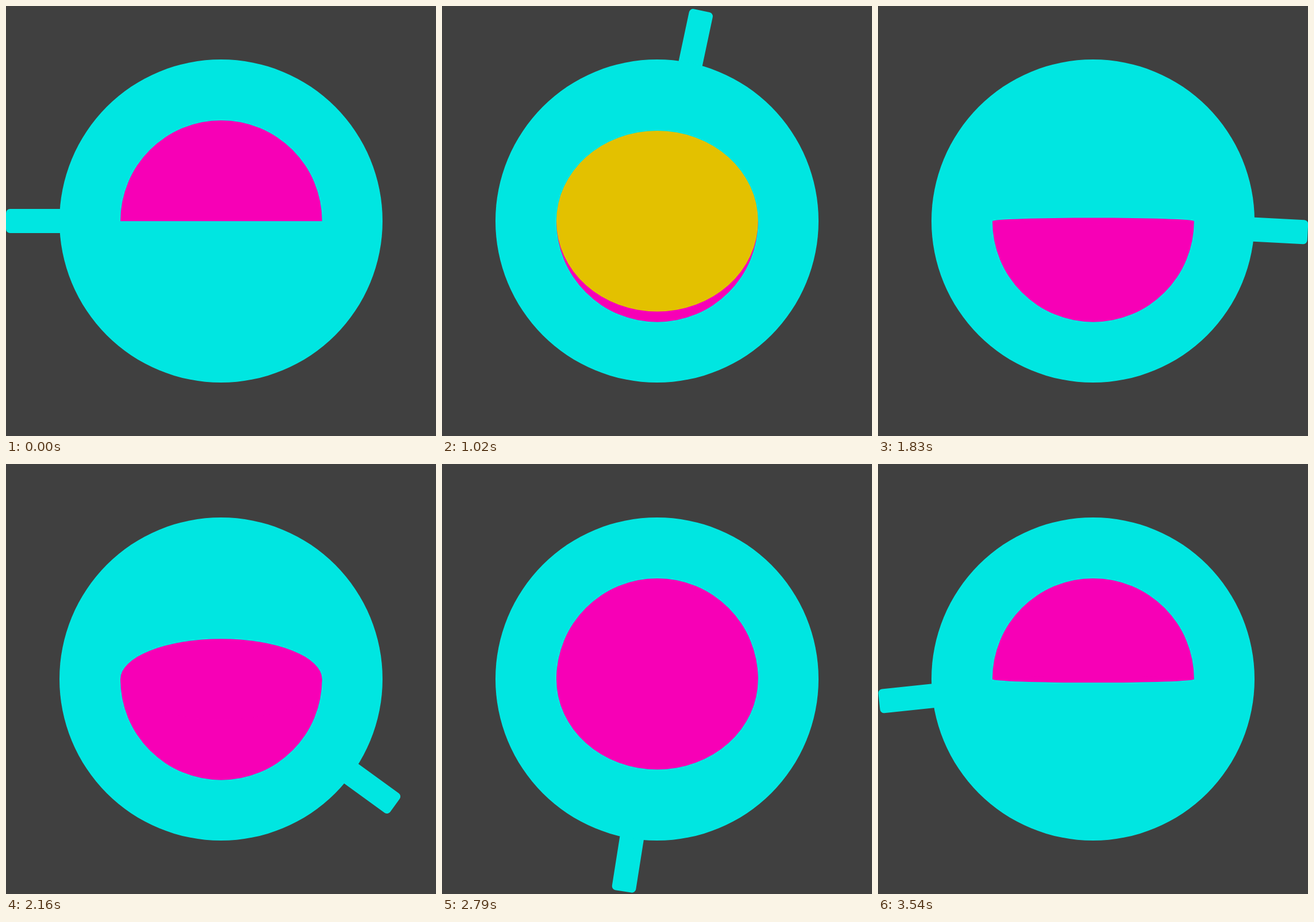
Animation of 748x748 px, one loop 3.57 s. Source, as an HTML page with a canvas:

```html
<!DOCTYPE html>
<html lang="en">
<head>
<meta charset="utf-8">
<title>Turning bowl</title>
<style>
  html, body { margin: 0; height: 100%; overflow: hidden; background: #404040; }
  canvas { display: block; }
</style>
</head>
<body>
<canvas width="748" height="748"></canvas>
<script>
const ctx = document.querySelector('canvas').getContext('2d');
const CYAN = '#00e6e1', PINK = '#f700b6', GOLD = '#e3c100';
const STEP = 30, STEPS = 119, MID = 374;
const BOWL = { x: 374.4, y: 374.3, r: 175.4 };

// The rim opens and closes linearly twice per turn; steps where it is flat or full.
const TURNS = [0, 31, 60, 90, 119];

function fillEllipse(color, x, y, rx, ry, from = 0, to = 2 * Math.PI) {
  ctx.fillStyle = color;
  ctx.beginPath();
  ctx.ellipse(x, y, rx, ry, 0, from, to);
  ctx.fill();
}

function drawHandle(degrees) {
  ctx.save();
  ctx.translate(MID, MID);
  ctx.rotate(degrees * Math.PI / 180);
  ctx.fillStyle = CYAN;
  ctx.beginPath();
  ctx.roundRect(-MID, -21, 200, 42, 7);
  ctx.fill();
  ctx.restore();
}

function drawBowl(step) {
  const { x, y, r } = BOWL;
  const quarter = TURNS.findIndex((start, i) => step < TURNS[i + 1]);
  const progress = (step - TURNS[quarter]) / (TURNS[quarter + 1] - TURNS[quarter]);
  const opening = quarter % 2 ? 1 - progress : progress;
  const start = quarter === 0 || quarter === 3 ? Math.PI : 0;
  fillEllipse(PINK, x, y, r, r, start, start + Math.PI);
  if (opening > 0) fillEllipse(quarter < 2 ? GOLD : PINK, x, y, r, r * opening);
}

function draw() {
  const step = Math.floor(performance.now() / STEP) % STEPS;
  ctx.fillStyle = '#404040';
  ctx.fillRect(0, 0, 748, 748);
  drawHandle(step * 3);
  fillEllipse(CYAN, MID, MID, 281, 281);
  drawBowl(step);
  requestAnimationFrame(draw);
}
draw();
</script>
</body>
</html>
```
